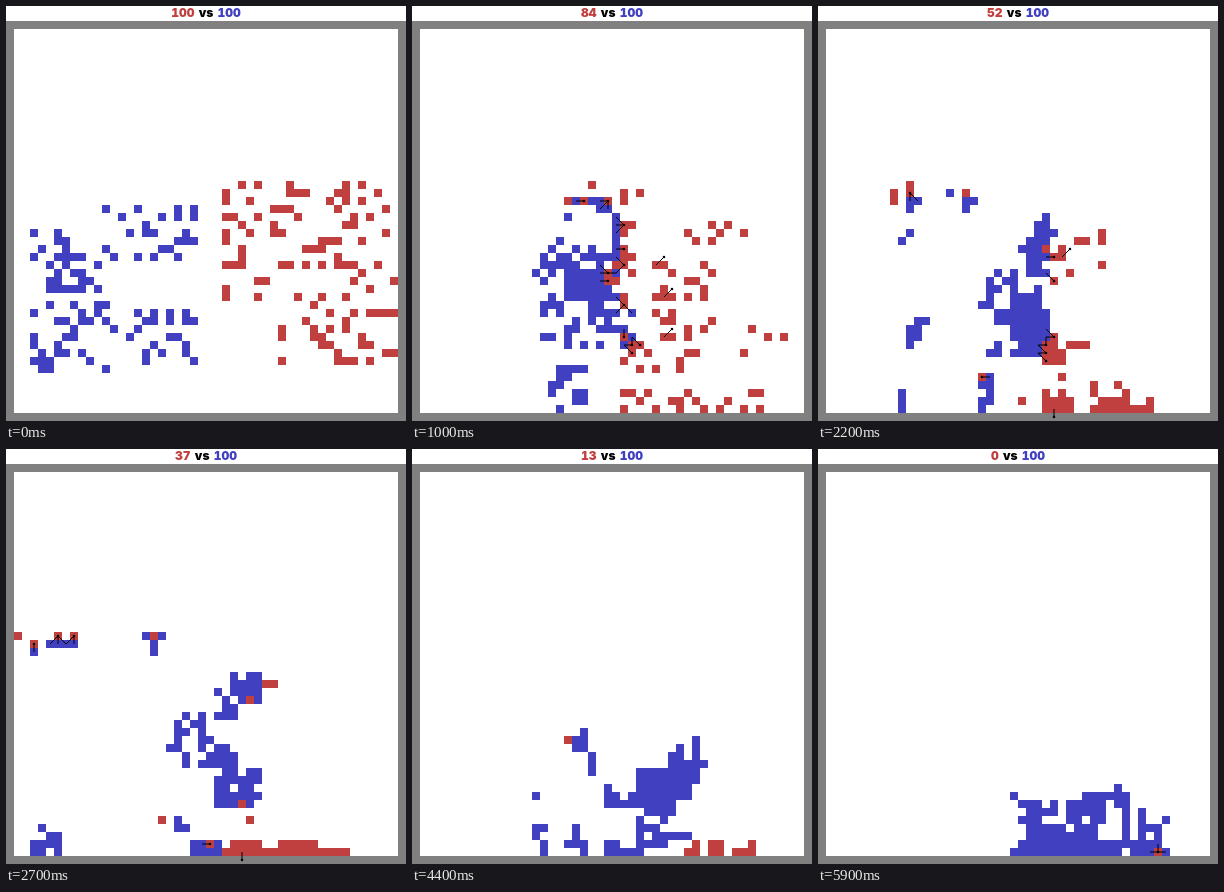
Animation, 400 px wide and 415 px high, one loop 6000 ms. Source, as an HTML page:

```html
<!DOCTYPE html>
<html lang="en">
<head>
<meta charset="utf-8">
<title>Red vs blue</title>
<style>
html, body { margin: 0; width: 100%; height: 100%; overflow: hidden; background: #fff; }
svg { display: block; width: 400px; height: 415px; }
text { font: 900 12px Inter, "Noto Sans", sans-serif; font-feature-settings: "tnum"; word-spacing: 1px; }
</style>
</head>
<body>
<svg viewBox="0 0 400 415">
  <rect width="400" height="415" fill="#fff"/>
  <rect y="15" width="400" height="400" fill="#808080"/>
  <rect x="8" y="23" width="384" height="384" fill="#fff"/>
  <text x="200" y="10.7" text-anchor="middle"><tspan id="score" fill="#c04040">100</tspan> vs <tspan fill="#4040c0">100</tspan></text>
  <g shape-rendering="crispEdges">
    <path id="blue" fill="#4040c0"/>
    <path id="red" fill="#c04040"/>
  </g>
  <path id="lines" stroke="#000" fill="none"/>
  <path id="dots" stroke="#000" stroke-width="2.6" stroke-linecap="round" fill="none"/>
</svg>
<script>
const SIZE = 48, STEPS = 60, STEP_MS = 100, TEAM = 100, FIRST_LOSS = 0.6;

let seed = 7;
const rnd = () => {
  seed = (seed + 0x6D2B79F5) | 0;
  let t = Math.imul(seed ^ seed >>> 15, 1 | seed);
  t = t + Math.imul(t ^ t >>> 7, 61 | t) ^ t;
  return ((t ^ t >>> 14) >>> 0) / 4294967296;
};
const pick = list => list[Math.floor(rnd() * list.length)];
const key = (x, y) => y * SIZE + x;
const inside = (x, y) => x >= 0 && y >= 0 && x < SIZE && y < SIZE;
const dist = (a, b) => Math.hypot(a.x - b.x, a.y - b.y);
const sides = [[0,-1],[-1,0],[1,0],[0,1],[-1,-1],[1,-1],[-1,1],[1,1]];

const poses = [];
const teams = { red: [], blue: [] };

// A blob is a block of cells; with a count, only that many are scattered in it.
function fill(blobs, taken, want) {
  const out = [];
  const add = (x, y) => {
    if (!inside(x, y) || taken.has(key(x, y))) return;
    taken.add(key(x, y));
    out.push({ x, y });
  };
  for (const [c, r, w = 1, h = 1, n = w * h] of blobs) {
    const free = [];
    for (let i = 0; i < w * h; i++) {
      const x = c + i % w, y = r + Math.floor(i / w);
      if (!taken.has(key(x, y))) free.push([x, y]);
    }
    for (let i = 0; i < n && free.length; i++)
      add(...free.splice(Math.floor(rnd() * free.length), 1)[0]);
  }
  while (out.length < want) {
    const o = pick(out), d = pick(sides);
    add(o.x + d[0], o.y + d[1]);
  }
  return want ? out.slice(0, want) : out;
}

// Units take the nearest goals; those left over fall on the way.
function advance(units, goals, k) {
  const live = units.filter(u => u.die === STEPS);
  const pairs = live.flatMap(u => goals.map(g => [dist(u.goals[k], g), u, g]));
  const used = new Set();
  for (const [, u, g] of pairs.sort((a, b) => a[0] - b[0])) {
    if (u.goals[k + 1] || used.has(g)) continue;
    used.add(g);
    u.goals.push(g);
  }
  const from = poses[k].at, span = poses[k + 1].at - from, wait = k ? 0 : FIRST_LOSS;
  for (const u of live) {
    if (u.goals[k + 1]) continue;
    const old = u.goals[k];
    u.goals.push(goals.reduce((a, b) => dist(b, old) < dist(a, old) ? b : a));
    u.die = from + Math.ceil(span * (wait + (1 - wait) * rnd()));
  }
}

function pose(at, score, blobs) {
  const k = poses.push({ at, score }) - 1, taken = new Set();
  for (const name of ["red", "blue"]) {
    const cells = fill(blobs[name], taken, name === "blue" || !k ? TEAM : 0);
    if (k) advance(teams[name], cells, k - 1);
    else teams[name] = cells.map(c => ({ goals: [c], die: STEPS, bold: rnd() < 0.12 }));
  }
}

pose(0, 100, {
  red: [[26,19,21,11,54], [33,29,15,13,40], [26,29,6,5,8]],
  blue: [[2,22,21,7,30], [2,28,9,5,20], [2,34,11,9,30], [14,35,9,7,22]]
});
pose(10, 84, {
  red: [[17,19,13,3,7], [25,24,2,5,6], [33,24,8,3,7], [23,29,4,6,8], [29,29,8,12,26],
    [25,38,11,5,10], [25,45,18,3,18], [38,30,8,11,4]],
  blue: [[18,21,6,3,6], [24,23,1,9], [18,27,6,7,32], [14,26,4,6,10], [16,42,5,6,14],
    [24,35,3,5,6], [15,33,10,7,28]]
});
pose(16, 71, {
  red: [[11,19,13,3,6], [33,25,5,2,5], [25,21,6,10,8], [26,33,11,11,24], [20,44,10,3,8],
    [34,46,7,1], [27,47,4,1], [33,47,7,1]],
  blue: [[13,21,5,3,6], [23,22,3,3,7], [20,26,6,5,20], [17,30,9,5,32], [16,45,5,1],
    [13,44,4,4,5], [21,35,5,5,19], [24,38,4,2,6]]
});
pose(27, 37, {
  red: [[0,19,9,3,4], [17,20], [31,26,2,1], [29,28], [28,41], [18,43], [29,43], [24,46],
    [27,46,4,1], [33,46,5,1], [26,47,16,1]],
  blue: [[1,20,8,3,5], [16,20,3,1], [17,21,1,2], [2,44,4,4,9], [19,42,3,3,3], [27,25,4,4,12],
    [25,27,3,5,8], [20,30,5,5,13], [21,34,7,3,13], [25,37,6,5,24], [22,46,5,2,7]]
});
pose(37, 20, {
  red: [[0,19,3,1], [9,43], [27,47,2,1], [30,47,12,1], [33,46,5,1], [40,46]],
  blue: [[0,20,3,1], [2,42,11,6,12], [23,27,2,4,3], [29,27,6,5,13], [23,32,8,6,29],
    [25,38,6,4,15], [27,42,4,4,11], [24,46,7,1], [23,47,4,1], [31,45,3,1]]
});
pose(51, 6, {
  red: [[36,47,2,1], [39,47,4,1]],
  blue: [[16,35,3,3,5], [33,35,4,5,7], [18,42,6,5,11], [30,39,5,2,6], [27,41,11,3,23],
    [27,44,9,2,16], [28,46,13,1], [23,47,13,1]]
});
pose(59, 0, {
  red: [[41,47]],
  blue: [[32,40,6,1], [23,41,6,3,10], [30,41,5,3,13], [37,41,1,5], [39,42,1,4], [41,44,1,2],
    [25,44,9,2,16], [24,46,18,1], [23,47,14,1], [38,47,5,1]]
});

// Nearest free cell to the unit's place on its way.
function settle(u, k, f, taken) {
  const a = u.goals[k], b = u.goals[k + 1];
  const x = Math.round(a.x + (b.x - a.x) * f), y = Math.round(a.y + (b.y - a.y) * f);
  let best = null, gap = Infinity;
  for (let d = 0; !best; d++)
    for (let j = -d; j <= d; j++)
      for (let i = -d; i <= d; i++) {
        const g = Math.hypot(i, j);
        if (g < gap && inside(x + i, y + j) && !taken.has(key(x + i, y + j))) {
          gap = g;
          best = { x: x + i, y: y + j };
        }
      }
  taken.add(key(best.x, best.y));
  return best;
}

const square = c => `M${8 + c.x * 8} ${23 + c.y * 8}h8v8h-8z`;
const spot = (x, y) => `${12 + x * 8} ${27 + y * 8}`;

function build(step) {
  let k = 0;
  while (k < poses.length - 2 && step >= poses[k + 1].at) k++;
  const a = poses[k], b = poses[k + 1], f = (step - a.at) / (b.at - a.at);
  const taken = new Set(), blueAt = new Set(), reds = [];
  const shape = { red: "", blue: "", lines: "", dots: "" };
  for (const name of ["red", "blue"])
    for (const u of teams[name]) {
      if (u.die <= step) continue;
      const c = settle(u, k, f, taken);
      shape[name] += square(c);
      if (name === "red") reds.push([u, c]);
      else blueAt.add(key(c.x, c.y));
    }

  const strike = (x, y, tx, ty) => {
    shape.lines += `M${spot(x, y)}L${spot(tx, ty)}`;
    shape.dots += `M${spot(tx, ty)}h.01`;
  };
  const fighting = k || f >= FIRST_LOSS;
  for (const [u, { x, y }] of reds) {
    const foes = sides.filter(([i, j]) => inside(x + i, y + j) && blueAt.has(key(x + i, y + j)));
    const last = reds.length < 3;
    if (foes.length && (last || rnd() < 0.5)) {
      const n = last ? 3 : 1 + Math.floor(rnd() * 3);
      for (const [i, j] of foes.slice(0, n)) strike(x + i, y + j, x, y);
    } else if (fighting && u.bold && !foes.length) {
      if (y === SIZE - 1) strike(x, y, x, y + 1);
      else strike(x, y, x + 1, y - 1);
    }
  }

  const t = k ? f : Math.max(0, (f - FIRST_LOSS) / (1 - FIRST_LOSS));
  shape.score = Math.round(a.score + (b.score - a.score) * t);
  return shape;
}

const steps = Array.from({ length: STEPS }, (_, i) => build(i));
const el = id => document.getElementById(id);
let shown = -1;

function draw(ms) {
  const i = Math.floor(ms / STEP_MS) % STEPS;
  if (i === shown) return;
  shown = i;
  for (const id of ["red", "blue", "lines", "dots"]) el(id).setAttribute("d", steps[i][id]);
  el("score").textContent = steps[i].score;
}

const start = performance.now();
function tick() {
  draw(performance.now() - start);
  requestAnimationFrame(tick);
}
tick();
</script>
</body>
</html>
```
